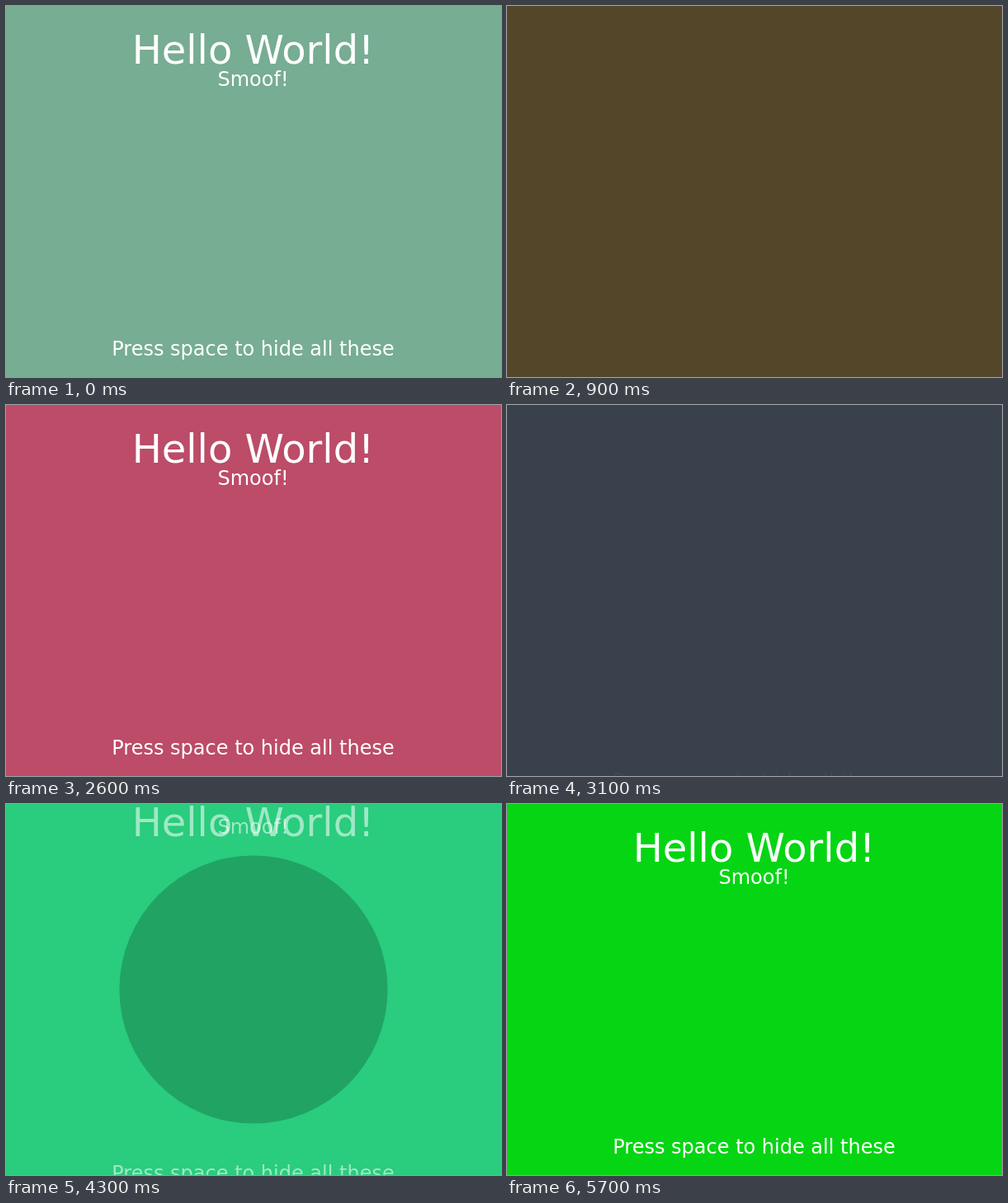
Recreate the animation shown at these times as an HTML page. Size 600 by 450 pixels, loop 5800 ms.

```html
<!DOCTYPE html>
<html lang="en">
<head>
<meta charset="utf-8">
<title>Hello World</title>
<style>
  html, body { margin: 0; width: 100%; height: 100%; overflow: hidden; }
  svg { display: block; width: 600px; height: 450px; }
  text { font: 24px "DejaVu Sans", sans-serif; fill: #fff; text-anchor: middle; }
  #title { font-size: 48px; }
</style>
</head>
<body>
<svg viewBox="0 0 600 450">
  <rect id="back" width="600" height="450"/>
  <circle id="shade" cx="300" cy="225"/>
  <text id="title" x="299.5" y="70">Hello World!</text>
  <text id="sub" x="299.5" y="97">Smoof!</text>
  <text id="hint" x="299.5" y="424">Press space to hide all these</text>
</svg>
<script>
const LOOP = 5800, STEP = 100;
const el = id => document.getElementById(id);

// Each key press toggles the texts and sends the background to a new colour.
// keep: share of the colour distance left after one step
const phases = [
  { at: 0, hide: 0, from: [119, 173, 146], to: [119, 173, 146], keep: 1 },
  { at: 330, hide: 1, from: [119, 173, 146], to: [166, 138, 78], keep: .45 },
  { at: 1517, hide: 0, from: [166, 138, 78], to: [188, 76, 104], keep: .6 },
  { at: 2770, hide: 1, from: [188, 76, 104], to: [58, 158, 174], keep: .75 },
  { at: 4217, hide: 0, from: [49, 202, 146], to: [4, 214, 13], keep: .81 }
];

// Vertical shift when hidden, and share of it left after one step
const texts = [
  { node: el("title"), shift: -73, keep: .35 },
  { node: el("sub"), shift: -131, keep: .4 },
  { node: el("hint"), shift: 49, keep: .6 }
];

function draw(ms) {
  const t = Math.floor(ms % LOOP / STEP) * STEP;
  const p = phases.filter(q => q.at <= t).pop();
  const n = (t - p.at) / STEP;
  const left = keep => Math.pow(keep, n);
  // 1 when fully hidden, 0 when fully shown
  const hidden = keep => p.at === 0 ? 0 : p.hide ? 1 - left(keep) : left(keep);

  const rgb = p.to.map((c, i) => Math.round(c + (p.from[i] - c) * left(p.keep)));
  el("back").setAttribute("fill", `rgb(${rgb})`);
  el("shade").setAttribute("r", 400 * hidden(.338));
  el("shade").setAttribute("fill-opacity", .5 * hidden(.338));

  for (const { node, shift, keep } of texts) {
    node.setAttribute("transform", `translate(0 ${(shift * hidden(keep)).toFixed(2)})`);
    node.setAttribute("fill-opacity", 1 - hidden(.38));
  }
}

const start = performance.now();
function tick() {
  draw(performance.now() - start);
  requestAnimationFrame(tick);
}
tick();
</script>
</body>
</html>
```
